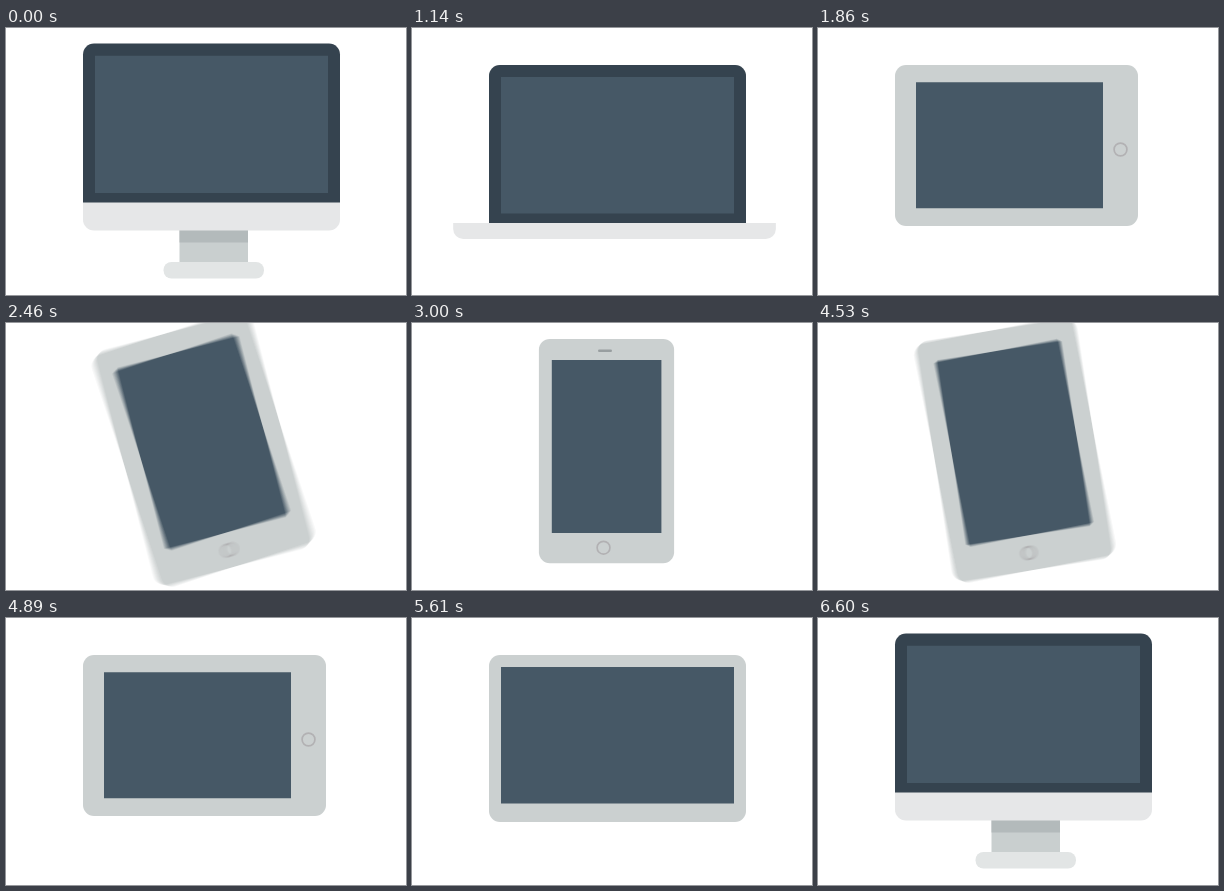
Recreate the animation shown at these times as an HTML page with a canvas. Size 400x267 px, loop 7170 ms.

```html
<!DOCTYPE html>
<html lang="en">
<head>
<meta charset="utf-8">
<title>Responsive devices</title>
<style>
  html, body { margin: 0; width: 100%; height: 100%; overflow: hidden; background: #fff; }
  canvas { display: block; width: 400px; height: 267px; }
</style>
</head>
<body>
<canvas id="stage"></canvas>
<script>
const W = 400, H = 267, LOOP = 7170, MIRROR = 7020;
const COLOR = {
  screen: '#465866', frame: '#35434f', body: [203, 208, 208], chin: [230, 231, 232],
  stand: '#c9cfcf', shade: '#b3babb', foot: '#e2e5e5', ring: '#b2b1b3', speaker: '#4a5357'
};

// Rectangles are [x, y, width, height].
const MONITOR = { panel: [77, 15.5, 257, 159], screen: [89, 27.7, 233, 137.3], chin: [77, 174, 257, 28.5] };
const LAPTOP = { panel: [77, 37, 257, 158], screen: [89, 49, 233, 136.5], chin: [41, 195, 323, 16], body: [77, 37, 257, 167] };
const STRIP = [77, 195, 257, 9];
const TABLET = { body: [77, 37, 243, 161], screen: [98, 54.3, 187, 126], button: [302.5, 121.5] };
const UPRIGHT = { body: [114.5, 6.5, 161, 243], screen: [132, 27.5, 126, 187], button: [191, 232] };
const PHONE = { body: [145.5, 30, 96.5, 196.5], screen: [151.5, 51.5, 85, 151.5], button: [192.3, 213.8] };

const main = document.getElementById('stage');
const buffer = document.createElement('canvas');
const scale = Math.max(1, window.devicePixelRatio || 1);
for (const c of [main, buffer]) {
  c.width = Math.round(W * scale);
  c.height = Math.round(H * scale);
}
const out = main.getContext('2d');
const g = buffer.getContext('2d');

const clamp = v => Math.min(1, Math.max(0, v));
const span = (t, from, to) => clamp((t - from) / (to - from));
const ease = p => p < 0.5 ? 4 * p ** 3 : 1 - 4 * (1 - p) ** 3;
const move = (t, from, to) => ease(span(t, from, to));
const mix = (a, b, p) => a.map((v, i) => v + (b[i] - v) * p);
const rgb = c => `rgb(${c.map(Math.round).join(',')})`;

function box(r, color, radius = 0) {
  g.fillStyle = color;
  g.beginPath();
  g.roundRect(...r, radius);
  g.fill();
}

function fade(alpha, draw) {
  if (alpha <= 0) return;
  g.globalAlpha = alpha;
  draw();
  g.globalAlpha = 1;
}

function ring([x, y]) {
  g.strokeStyle = COLOR.ring;
  g.lineWidth = 1.7;
  g.beginPath();
  g.arc(x, y, 6.4, 0, Math.PI * 2);
  g.stroke();
}

function desktop(t) {
  const p = move(t, 420, 900);
  const lift = -45 * p;
  if (p < 1) {
    box([173.5, 202 + lift, 68.5, 33], COLOR.stand);
    box([173.5, 202 + lift, 68.5, 12.5], COLOR.shade);
    box([157.5, 234 + lift, 100.5, 16.5], COLOR.foot, 8);
  }
  box(mix(MONITOR.chin, LAPTOP.chin, p), rgb(COLOR.chin), [0, 0, 11 - p, 11 - p]);
  box(mix(MONITOR.panel, LAPTOP.panel, p), COLOR.frame, [11, 11, 0, 0]);
  box(mix(MONITOR.screen, LAPTOP.screen, p), COLOR.screen);
}

function laptopToTablet(t) {
  const fold = move(t, 1110, 1400);
  const lid = 1 - move(t, 1110, 1430);
  const p = move(t, 1410, 1830);
  box(mix(LAPTOP.body, TABLET.body, p), rgb(COLOR.body), 11);
  fade(lid, () => box(LAPTOP.panel, COLOR.frame, [11, 11, 0, 0]));
  if (fold < 1) {
    box(mix(LAPTOP.chin, STRIP, fold), rgb(mix(COLOR.chin, COLOR.body, fold)), [0, 0, 10, 10]);
  }
  box(mix(LAPTOP.screen, TABLET.screen, p), COLOR.screen);
  fade(span(t, 1620, 1860), () => ring(TABLET.button));
}

function turningTablet(t) {
  const p = move(t, 2133, 2643);
  g.save();
  g.translate(198.5 - 3.5 * p ** 6, 117.5 + 10.5 * p);
  g.rotate(p * Math.PI / 2);
  g.translate(-198.5, -117.5);
  box(TABLET.body, rgb(COLOR.body), 11);
  box(TABLET.screen, COLOR.screen);
  ring(TABLET.button);
  g.restore();
}

function tabletToPhone(t) {
  const p = move(t, 2820, 3210);
  const part = name => mix(UPRIGHT[name], PHONE[name], p);
  box(part('body'), rgb(COLOR.body), 11);
  box(part('screen'), COLOR.screen);
  ring(part('button'));
  fade(p, () => box([186, 18 + 21 * p, 14, 2.6], COLOR.speaker, 1.3));
}

function scene(t) {
  g.setTransform(scale, 0, 0, scale, 0, 0);
  g.fillStyle = '#fff';
  g.fillRect(0, 0, W, H);
  if (t <= 1110) desktop(t);
  else if (t <= 1860) laptopToTablet(t);
  else if (t <= 2650) turningTablet(t);
  else tabletToPhone(t);
}

// The second half of the loop runs the first half backwards.
function render(ms) {
  const time = ms % LOOP;
  const t = Math.max(0, Math.min(time, MIRROR - time));
  const turning = t > 2130 && t < 2640;
  const samples = turning ? 9 : 1;
  const shutter = 15;
  for (let i = 0; i < samples; i++) {
    scene(turning ? t + shutter * (i / (samples - 1) - 0.5) : t);
    out.globalAlpha = 1 / (i + 1);
    out.drawImage(buffer, 0, 0);
  }
}

const start = performance.now();
function tick() {
  render(performance.now() - start);
  requestAnimationFrame(tick);
}
tick();
</script>
</body>
</html>
```
